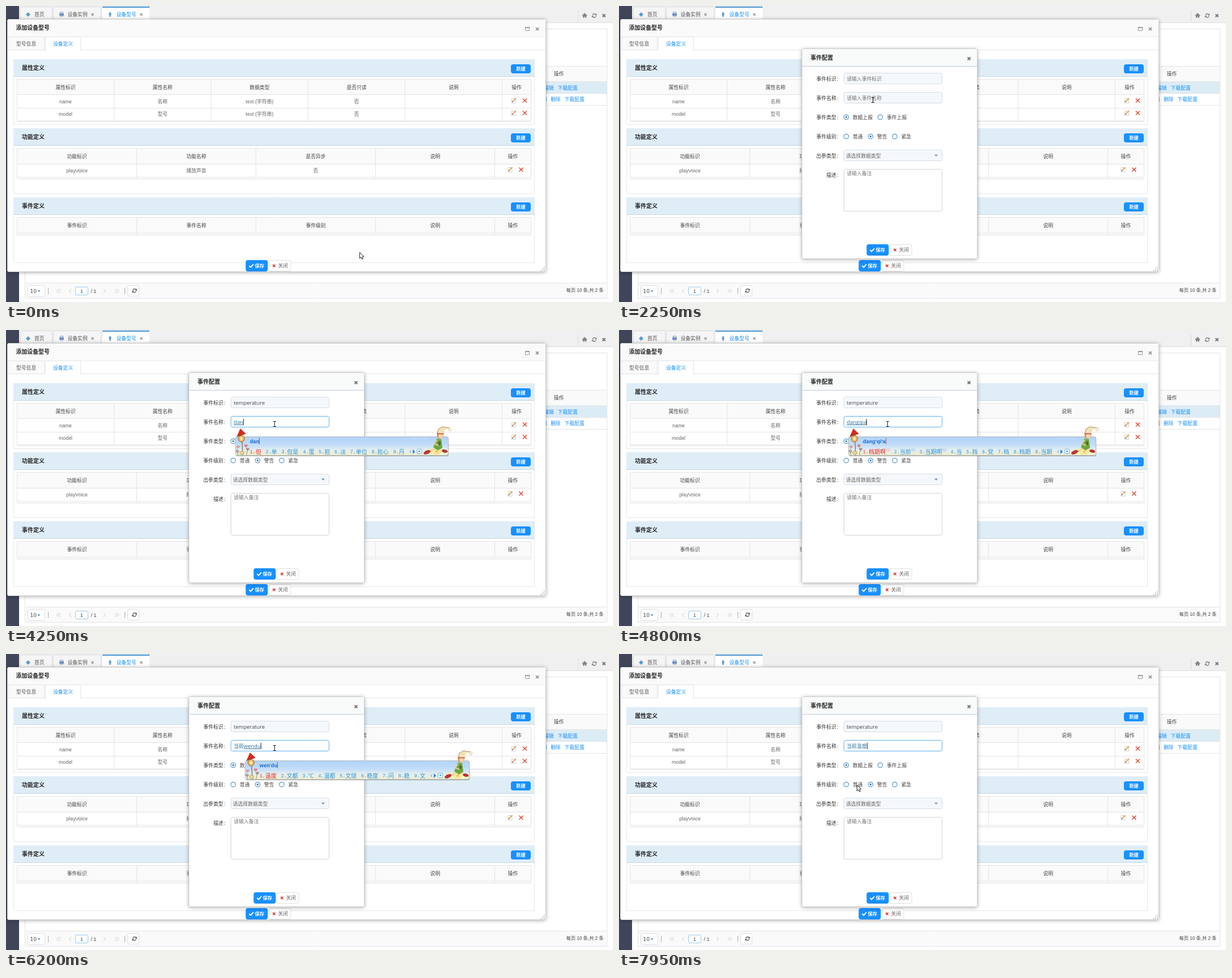
An HTML page with a canvas for the animation above (8000 ms loop, 1070 by 523 pixels).

```html
<!DOCTYPE html>
<html lang="zh">
<head>
<meta charset="utf-8">
<title>设备定义</title>
<style>
html, body { margin: 0; width: 100%; height: 100%; overflow: hidden; background: #fff; }
canvas { display: block; width: 1070px; height: 523px; }
</style>
</head>
<body>
<canvas id="stage" width="1070" height="523"></canvas>
<script>
const g = document.getElementById('stage').getContext('2d');
const LOOP = 8000, STEP = 50;
const UI = '"Liberation Sans","Noto Sans CJK SC","Noto Sans CJK",sans-serif';
const INPUT = '"Open Sans","Noto Sans CJK SC","Noto Sans CJK",sans-serif';
const BLUE = '#1890ff', LINE = '#e4e4e4', TXT = '#444';

function box(x, y, w, h, fill, stroke, r = 0) {
  g.beginPath();
  if (stroke) g.roundRect(x + .5, y + .5, w - 1, h - 1, r);
  else g.roundRect(x, y, w, h, r);
  if (fill) { g.fillStyle = fill; g.fill(); }
  if (stroke) { g.strokeStyle = stroke; g.lineWidth = 1; g.stroke(); }
}

// y is the visual middle of the line
function text(s, x, y, color = TXT, size = 8.8, align = 'left', weight = 400, family = UI) {
  g.font = `${weight} ${size}px ${family}`;
  g.textAlign = align;
  g.fillStyle = color;
  g.fillText(s, x, y + size * .36);
  return g.measureText(s).width;
}

function path(pts, color, width, close) {
  g.beginPath();
  for (let i = 0; i < pts.length; i += 2) g.lineTo(pts[i], pts[i + 1]);
  if (close) g.closePath();
  g.lineWidth = width || 1;
  if (width) { g.strokeStyle = color; g.stroke(); }
  else { g.fillStyle = color; g.fill(); }
}

function oval(x, y, rx, ry, fill, stroke, width = 1, turn = 0) {
  g.beginPath();
  g.ellipse(x, y, rx, ry, turn, 0, 7);
  if (fill) { g.fillStyle = fill; g.fill(); }
  if (stroke) { g.strokeStyle = stroke; g.lineWidth = width; g.stroke(); }
}

function cross(x, y, r, color, width) {
  path([x - r, y - r, x + r, y + r], color, width);
  path([x + r, y - r, x - r, y + r], color, width);
}

function refresh(x, y, color) {
  g.strokeStyle = color;
  g.lineWidth = 1.2;
  for (const a of [.3, Math.PI + .3]) {
    g.beginPath();
    g.arc(x, y, 3.2, a, a + 2.2);
    g.stroke();
  }
  path([x + 4.2, y - 3.8, x + 4.2, y - .3, x + 1, y - .3], color, 0, true);
  path([x - 4.2, y + 3.8, x - 4.2, y + .3, x - 1, y + .3], color, 0, true);
}

function shadowed(x, y, w, h, blur, r) {
  g.save();
  g.shadowColor = 'rgba(0,0,0,.32)';
  g.shadowBlur = blur;
  g.shadowOffsetY = 1;
  box(x, y, w, h, '#fff', null, r);
  g.restore();
  box(x, y, w, h, null, '#cdcdcd', r);
}

function buttons(x, y) {
  box(x, y, 39, 20, BLUE, null, 4);
  path([x + 6, y + 10, x + 8.8, y + 12.6, x + 13.6, y + 7.4], '#fff', 1.9);
  text('保存', x + 16, y + 9.5, '#fff', 8.4, 'left', 700);
  box(x + 41, y, 39, 20, '#fff', '#e0e0e0', 3);
  cross(x + 50, y + 10, 2.2, '#d9453f', 1.8);
  text('关闭', x + 57, y + 9.5, '#666', 8.8);
}

function backdrop() {
  box(0, 0, 1070, 523, '#fff');
  box(23, 0, 1047, 30, '#f0f0f0');
  box(23, 29, 1047, 1, '#dedede');
  box(0, 0, 23, 523, '#40455a');
  box(25, 1, 57, 29, '#f5f5f5', '#dcdcdc', 2);
  box(83, 1, 85, 29, '#f5f5f5', '#dcdcdc', 2);
  box(170, 1, 83, 29, '#fff');
  box(170, 1, 83, 2, '#4a96d2');
  path([39, 11, 43, 15, 39, 19, 35, 15], '#5b9bd0', 0, true);
  text('首页', 50, 15, '#555');
  box(94, 13, 8, 4, '#6f8fc0', null, 1);
  box(95, 10.5, 6, 8, null, '#6f8fc0');
  text('设备实例', 108.5, 15, '#555');
  cross(152.5, 15, 2, '#999', 1.4);
  path([183.5, 11, 183.5, 19], '#4a8cc5', 2.2);
  path([181, 14.5, 186, 14.5], '#4a8cc5', 1.3);
  text('设备型号', 194.5, 15, BLUE);
  cross(238.5, 15, 2, '#999', 1.4);
  box(1008, 8, 1, 20, '#dcdcdc');
  path([1015.8, 17.3, 1020, 13.2, 1024.2, 17.3], '#777', 1.2);
  path([1017, 17.5, 1020, 14.5, 1023, 17.5, 1023, 20.5, 1017, 20.5], '#777', 0, true);
  box(1019.2, 18.5, 1.6, 2, '#f0f0f0');
  refresh(1037, 17, '#777');
  cross(1054, 17, 2.5, '#777', 1.9);

  box(33, 40, 1027, 476, '#fff', LINE);
  box(900, 106, 160, 28, '#fafafa', LINE);
  text('操作', 974.5, 120, TXT, 8.8, 'center');
  box(900, 134, 159, 20, '#dcecf5');
  box(900, 154, 159, 1, LINE);
  box(900, 175, 159, 1, LINE);
  text('编辑', 948, 145, BLUE);
  text('下载配置', 972.5, 145, BLUE);
  text('编辑', 936, 165, BLUE);
  text('删除', 960, 165, BLUE);
  text('下载配置', 984.5, 165, BLUE);

  box(33, 489, 1027, 28, '#fafafa', LINE);
  box(38, 493, 31, 21, '#fff', '#ddd', 3);
  text('10', 42.5, 504, TXT, 9, 'left', 400, '"DejaVu Sans",sans-serif');
  path([55.5, 502.5, 60.5, 502.5, 58, 505.5], '#4a8cc5', 0, true);
  for (const x of [74, 209]) box(x, 498, 1, 11, '#aaa');
  const chevron = (x, d) => path([x + d * 2, 500, x - d * 1.5, 503.5, x + d * 2, 507], '#c8c8c8', 1);
  for (const x of [90.5, 94.5, 113]) chevron(x, 1);
  for (const x of [174, 193.5, 197.5]) chevron(x, -1);
  box(122, 496, 23, 15, '#fff', '#9cc8ea', 2);
  text('1', 133.5, 503.5, TXT, 8.8, 'center');
  text('/ 1', 149.5, 503.5);
  box(214, 493, 21, 20, '#fff', '#ddd', 3);
  refresh(226.5, 503, '#444');
  text('每页 10 条,共 2 条', 1053.5, 502.5, TXT, 8.2, 'right');
}

function actions(x, y) {
  box(x - 4, y - 4, 8, 9, '#fff', '#cfcfcf');
  path([x - 2, y + 2, x + 4, y - 4], '#d9a850', 1.8);
  path([x - 2.8, y + 2.8, x - 1.5, y + 1.5], '#555', 1.3);
  cross(x + 19.5, y, 3.5, '#e8402f', 1.4);
}

function section(top, height, title, cols, heads, rows, iconX) {
  box(13, top, 919, height, '#fff', '#e3e7ea');
  box(13, top, 918, 31, '#dfedf7');
  box(13, top + 30, 918, 1, '#c5d7e2');
  text(title, 28, top + 15, '#222', 10, 'left', 700);
  box(890, top + 9, 35, 16, BLUE, null, 4);
  text('新建', 907.5, top + 16.5, '#fff', 8.4, 'center', 700);
  const y = top + 36, headH = top < 100 ? 28 : 29;
  const bottom = y + headH + rows.length * 22.5;
  box(19, y - 1, 907, headH, '#fafafa', LINE);
  cols.forEach((x, i) => {
    const end = top > 300 ? y + headH : bottom;
    box(x, y, 1, end - y, LINE);
    if (heads[i]) text(heads[i], (x + cols[i + 1]) / 2 + .5, y + 14, TXT, 8.8, 'center');
  });
  rows.forEach((row, k) => {
    const mid = y + 39 + k * 22;
    row.forEach((s, i) => text(s, (cols[i] + cols[i + 1]) / 2 + .5, mid, '#666', 8.8, 'center'));
    box(19, y + 50 + k * 22.5 | 0, 907, 1, LINE);
    actions(iconX, mid - 2);
  });
  box(19, Math.round(bottom) + 1, 907, 1, '#dcdcdc');
}

function dialog() {
  shadowed(2, 23, 950, 447, 6, 4);
  box(3, 24, 948, 30, '#fafafa', null, 3);
  box(3, 54, 948, 1, '#eaeaea');
  text('添加设备型号', 17.5, 38.5, '#222', 9.9, 'left', 700);
  box(915, 37, 8, 7, null, '#999');
  box(915, 37, 8, 2, '#999');
  cross(936.5, 40.7, 2.5, '#999', 1.9);
  box(4, 54, 64, 24, '#fafafa', LINE);
  box(3, 77, 948, 1, LINE);
  box(69, 54, 63, 25, '#fff', LINE);
  box(70, 77, 61, 2, '#fff');
  text('型号信息', 18, 66.5, '#555');
  text('设备定义', 83, 66.5, BLUE);
  section(94, 116, '属性定义', [19, 190, 361, 532, 703, 874, 925],
    ['属性标识', '属性名称', '数据类型', '是否只读', '说明', '操作'],
    [['name', '名称', 'text (字符串)', '否'], ['model', '型号', 'text (字符串)', '否']], 895);
  const cols = [19, 230, 440, 651, 861, 925];
  section(216, 116, '功能定义', cols, ['功能标识', '功能名称', '是否异步', '说明', '操作'],
    [['playVoice', '播放声音', '否']], 888.5);
  section(338, 116, '事件定义', cols, ['事件标识', '事件名称', '事件级别', '说明', '操作'], []);
  buttons(422.5, 449);
  for (let i = 0; i < 3; i++)
    for (let j = 0; j <= i; j++) box(948 - j * 3, 461 + i * 3, 1.3, 1.3, '#888');
}

// [time, composing letters, reading shown, candidates; * marks a cloud result]
const TYPING = [
  [4000, 'd', 'd', '的 到 对 得 都 大家 但是 等等 多少'],
  [4100, 'da', 'da', '大 打 达 大家 答 搭 大概 打开 大小'],
  [4250, 'dan', 'dan', '但 单 但是 蛋 担 淡 单位 担心 丹'],
  [4450, 'dang', 'dang', '当 党 档 当然 挡 荡 当时 当前 铛'],
  [4600, 'dangq', "dang'q", '当前 当期 党旗 档期 当 党 档 挡 荡'],
  [4700, 'dangqi', "dang'qi", '当期 党旗 档期 当起 荡起 当 党 档 挡'],
  [4800, 'dangqia', "dang'qi'a", '档期啊* 当前* 当期啊* 当 挡 党 档 档期 当期'],
  [4950, 'dangqian', "dang'qian", '当前 荡前 当钱 当 党 档 挡 荡 铛'],
  [5350, '', '', '', '当前'],
  [5700, 'w', 'w', '我 为 我们 无 问 完 位 王 外面'],
  [5750, 'we', 'we', '为 问 我们 微 位 未 文 外面 外'],
  [5900, 'wen', 'wen', '问 文 稳 温 闻 问题 文字 吻 纹'],
  [6050, 'wend', "wen'd", '文档 温度 稳定 问道 闻到 稳当 稳的 问答 温带'],
  [6200, 'wendu', "wen'du", '温度 文都 ℃ 温都 文牍 稳度 问 稳 文'],
  [6600, '', '', '', '当前温度']
];

function field(y, hint, value, focus, caret, fixed = '') {
  box(396, y, 174, 20, focus ? '#fff' : '#f5f8fb', focus ? '#5fb0ee' : '#d3dde4', 3);
  const mid = y + 10.5, color = focus ? '#2a6f9e' : TXT;
  let x = 401.5;
  if (!fixed && !value) text(hint, x, mid, '#777', 8.8);
  if (fixed) x += text(fixed, x, mid, color, 8.8, 'left', 400, INPUT);
  if (value) {
    const w = text(value, x, mid, color, 9.3, 'left', 400, INPUT);
    if (focus && y > 140) box(x, Math.round(mid + 4), w, 1, color);
    x += w;
  }
  if (focus && caret) box(Math.round(x), y + 5, 1, 11, '#222');
}

function radio(x, y, label, on) {
  oval(x, y, 4.2, 4.2, '#fff', '#5b96c4', 1.2);
  if (on) oval(x, y, 1.8, 1.8, '#4a87b8');
  text(label, x + 11.5, y);
}

function modal(t, now) {
  shadowed(322, 75, 310, 372, 6, 3);
  box(323, 76, 308, 31, '#f9fafa', null, 2);
  box(323, 106, 308, 1, '#c0d0dc');
  text('事件配置', 337.5, 91, '#222', 10, 'left', 700);
  cross(617, 93, 2.5, '#777', 1.9);
  ['事件标识', '事件名称', '事件类型', '事件级别', '出参类型', '描述'].forEach((s, i) => {
    const y = 128.5 + i * 34;
    text(s, 383, y, '#333', 8.8, 'right');
    text(':', 384.5, y, '#333');
  });
  const at = now ? now[0] : t < 3450 ? (t < 2850 ? 2700 : 2850) : 3450;
  const caret = (t - at) % 1060 < 530;
  const fixed = t >= 6600 ? '当前温度' : t >= 5350 ? '当前' : '';
  field(118, '请输入事件标识', t >= 2850 ? 'temperature' : '', t >= 2700 && t < 3450, caret);
  field(152, '请输入事件名称', now ? now[1] : '', t >= 3450, caret, fixed);
  radio(400.5, 196.5, '数据上报', true);
  radio(460.5, 196.5, '事件上报');
  radio(400.5, 230.5, '普通');
  radio(443.5, 230.5, '警告', true);
  radio(486, 230.5, '紧急');
  box(396, 254, 174, 20, '#f5f8fb', '#d3dde4', 3);
  text('请选择数据类型', 400, 264.5, '#666');
  path([556, 262.5, 562, 262.5, 559, 266], '#6a94b8', 0, true);
  box(396, 288, 174, 75, '#fff', '#ccd4da', 3);
  text('请输入备注', 401.5, 295.5, '#777');
  buttons(436.5, 421);
}

function heart(x, y, r, color) {
  oval(x - r * .5, y, r * .6, r * .6, color);
  oval(x + r * .5, y, r * .6, r * .6, color);
  path([x - r, y + .3, x + r, y + .3, x, y + r * 1.4], color, 0, true);
}

function lantern(x) {
  path([x + 12, 190, x + 13, 221], '#8c7a55', 1.4);
  oval(x + 11, 192, 5.5, 6, '#efb45c', '#9c6a35');
  oval(x + 11, 192, 2, 3, '#fff0b8');
  path([x + 9, 174, x + 18.5, 183, x + 3, 188], '#d52d1e', 0, true);
  path([x + 3, 188, x + 18.5, 183], '#8b211a', 1.2);
  path([x + 5, 221, x + 3, 210], '#8a9a69', 1);
  path([x + 20, 221, x + 22, 209], '#8a9a69', 1);
  heart(x + 5, 206, 2.8, '#d99aa0');
  heart(x + 19, 204, 2.8, '#e27f80');
  heart(x + 22, 210, 2.8, '#a98d92');
  heart(x + 4, 214, 2.8, '#b39b9d');
  oval(x + 12, 217, 4, 3, '#e9d792', '#a4976b', .7);
}

function elf(r) {
  oval(r - 30, 215, 17, 6, '#f6e9a0');
  for (let i = 0; i < 5; i++) oval(r - 45 + i * 9, 215 + i % 2 * 3, 2.4, 2.2, i % 2 ? '#fff7d0' : '#efc85a');
  path([r - 28, 207, r - 38, 215], '#f0d0a8', 2.6);
  path([r - 22, 207, r - 16, 213], '#f0d0a8', 2.6);
  oval(r - 44, 216, 6, 2.6, '#cf2f36', '#7d2020', .8, -.4);
  oval(r - 13, 214, 4.5, 2.2, '#cf2f36', '#7d2020', .8, .2);
  path([r - 27, 192, r - 19, 193, r - 17, 208, r - 25, 213, r - 33, 207], '#6ea63b', 0, true);
  path([r - 26, 194, r - 31, 201, r - 24, 204], '#edc9a0', 2);
  oval(r - 22, 200, 2, 3.6, '#416f2c');
  oval(r - 21, 186, 5.6, 6, '#d58c3d');
  oval(r - 20, 187, 4.2, 4.2, '#f6d5ae');
  path([r - 26, 183, r - 24, 175, r - 17, 171, r - 5, 173, r - 13, 176, r - 14, 183], '#f1e3b5', 0, true);
  path([r - 26, 183, r - 24, 175, r - 17, 171, r - 5, 173], '#927446', .8);
  oval(r - 4, 175.5, 2.6, 2.8, '#fff8df', '#c3ab78', .7);
  path([r - 26.5, 183, r - 14, 183.5], '#c6503c', 1.6);
}

function ime(left, reading, list) {
  const items = list.split(' ').map(s => ({ word: s.replace('*', ''), cloud: s.endsWith('*') }));
  const width = c => 17.8 + c.word.length * 10 + (c.cloud ? 7 : 0);
  const end = left + 18 + items.reduce((sum, c) => sum + width(c), 0);
  const r = end + 84;
  const bg = g.createLinearGradient(0, 188, 0, 222);
  bg.addColorStop(0, '#afd1f8');
  bg.addColorStop(.45, '#c3ddfa');
  bg.addColorStop(.7, '#e4eeee');
  bg.addColorStop(1, '#f1edcc');
  box(left + 1, 189, r - left - 7, 34, 'rgba(60,60,60,.45)', null, 3);
  box(left, 188, r - left - 6, 34, bg, '#b9c0b8', 3);
  for (let i = 0; i < 8; i++) box(r - 73 + i * 4, 190 + i * 5 % 3, 1, 1, '#fff');
  const w = text(reading, left + 26, 197, '#1769d2', 9.2, 'left', 700);
  box(Math.round(left + 26 + w), 191, 1, 11, '#e33');
  let x = left + 26;
  items.forEach((c, i) => {
    const color = i ? '#2b93e0' : '#ec2b35';
    text(i + 1 + '.', x, 215, color, 8.4, 'left', 400, '"Liberation Mono",monospace');
    text(c.word, x + 10, 215, color, 10);
    if (c.cloud) {
      const cx = x + 14 + c.word.length * 10;
      oval(cx, 212, 3.5, 1.7, '#fff', i ? '#7bb2e0' : '#e89a9a', .8);
      oval(cx, 211, 1.5, 1.5, '#fff', i ? '#7bb2e0' : '#e89a9a', .6);
    }
    x += width(c);
  });
  path([end + 12, 211.5, end + 8.5, 215, end + 12, 218.5], '#a7c8e8', 0, true);
  path([end + 15, 211, end + 19, 215, end + 15, 219], '#1683e0', 0, true);
  box(end + 22, 210, 9, 9, '#eef7ff', '#76b5e8', 1);
  path([end + 24.5, 213.5, end + 28.5, 213.5, end + 26.5, 216], '#1683e0', 0, true);
  lantern(left);
  elf(r);
}

const MOVES = [
  [100, 623, 435], [450, 853, 371], [550, 853, 371], [750, 831, 367], [1100, 898, 354],
  [1550, 898, 354], [1600, 884, 358], [1700, 852, 353], [1800, 852, 353], [2250, 447, 166],
  [2500, 470, 131], [2900, 470, 131], [3300, 473, 166], [6850, 473, 166], [6950, 512, 186],
  [7100, 512, 186], [7300, 519, 194], [7650, 430, 235], [7800, 418, 230], [7900, 418, 230], [7950, 419, 231]
];

function pointer(t) {
  const i = MOVES.findIndex(m => m[0] > t);
  if (i === 0) return MOVES[0].slice(1);
  if (i < 0) return MOVES[MOVES.length - 1].slice(1);
  const [a, x, y] = MOVES[i - 1], [b, u, v] = MOVES[i];
  let k = (t - a) / (b - a);
  k = k * k * (3 - 2 * k);
  return [x + (u - x) * k, y + (v - y) * k].map(Math.round);
}

function cursor(t) {
  const [x, y] = pointer(t);
  const inside = (top, bottom) => x > 396 && x < 570 && y > top && y < bottom;
  if (t >= 1400 && (inside(118, 138) || inside(152, 172) || inside(288, 363))) {
    path([x + .5, y - 4, x + .5, y + 4.5], '#222', 1);
    path([x - 2, y - 4.5, x + 3, y - 4.5], '#222', 1);
    path([x - 2, y + 4.5, x + 3, y + 4.5], '#222', 1);
    return;
  }
  const shape = [0, 0, 0, 10.5, 2.5, 8.2, 4.2, 12, 6, 11.2, 4.4, 7.5, 7.5, 7.2]
    .map((n, i) => n + .5 + (i % 2 ? y : x));
  path(shape, '#fff', 0, true);
  path(shape, '#222', 1, true);
}

function draw(t) {
  backdrop();
  dialog();
  if (t >= 1400) {
    const n = TYPING.filter(s => s[0] <= t).length;
    const now = TYPING[n - 1];
    modal(t, now);
    if (now) {
      // after a commit the candidate bar fades away
      const shown = now[1] ? now : TYPING[n - 2];
      const alpha = now[1] ? 1 : 1 - (t - now[0] + STEP) / 150;
      if (alpha > .01) {
        g.globalAlpha = alpha;
        ime(shown[0] < 5350 ? 404 : 421, shown[2], shown[3]);
        g.globalAlpha = 1;
      }
    }
  }
  cursor(t);
}

const start = performance.now();
function tick() {
  const t = (performance.now() - start) % LOOP;
  draw(Math.floor(t / STEP) * STEP);
  requestAnimationFrame(tick);
}
tick();
</script>
</body>
</html>
```
